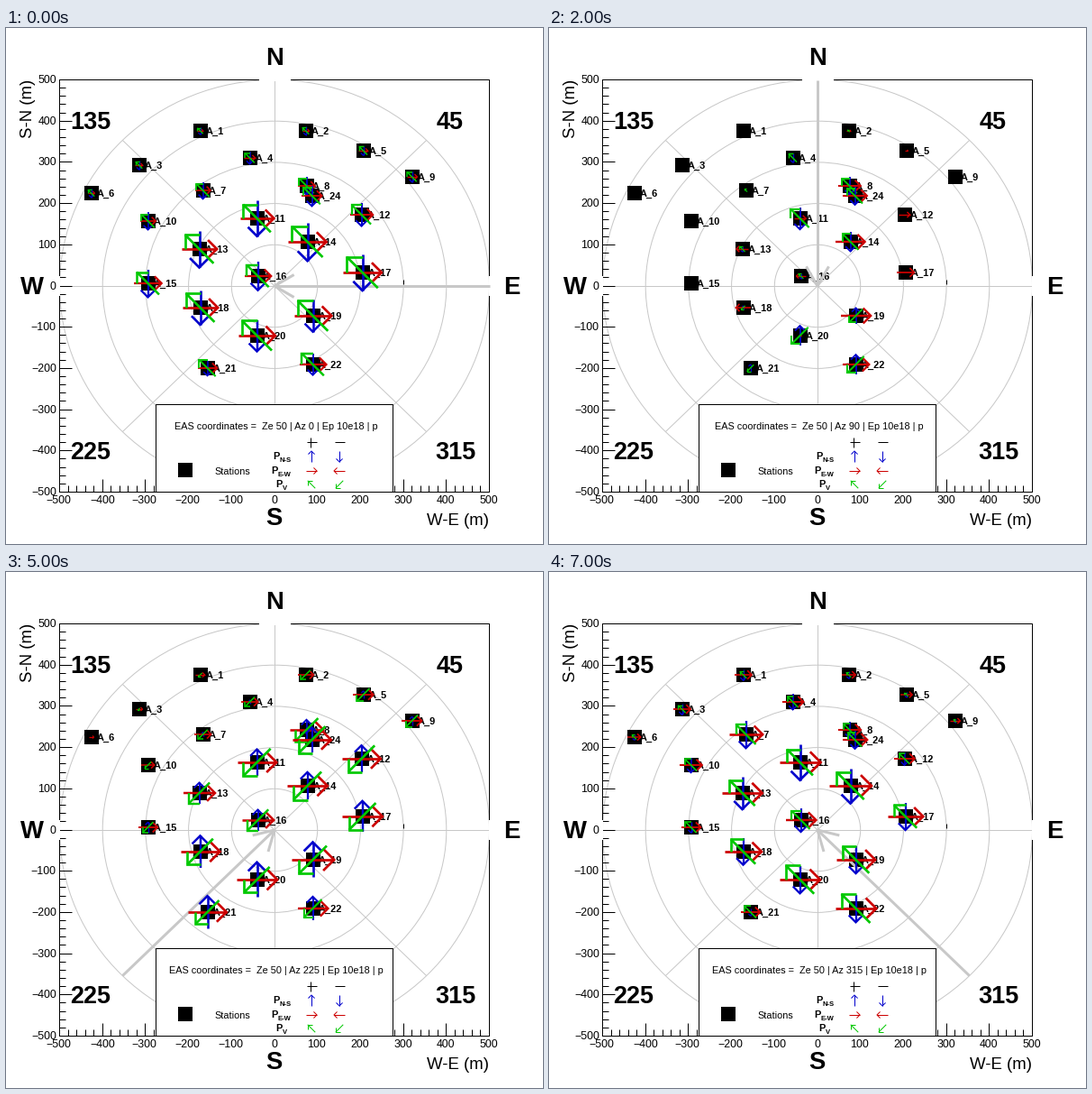
A matplotlib script for the animation above (8 s loop, 596 px wide and 572 px high).

```python
import numpy as np
import matplotlib.pyplot as plt
from matplotlib.animation import FuncAnimation
from matplotlib.collections import LineCollection
from matplotlib.patches import Ellipse, Rectangle

W, H, DPI = 596, 572, 100
PX = 72 / DPI
CX, CY, SX, SY = 298.0, 286.0, 0.477, 0.457   # plot centre, pixels per metre
RED, BLUE, GREEN = "#cc0000", "#0000cc", "#00c800"
GRID, BEAM = "#c8c8c8", "#c8c8c8"
ZENITH = np.radians(50)
FIELD = np.array([0, 0.82, 0.574])
EXCESS = 0.16                                 # radial share of the signal

# number: pixel position
STATIONS = {
    1: (216, 114), 2: (333, 114), 3: (148, 152), 4: (271, 144),
    5: (397, 136), 6: (95, 183), 7: (219, 180), 8: (334, 175),
    9: (451, 165), 10: (158, 214), 11: (279, 211), 12: (395, 207),
    13: (215, 245), 14: (335, 237), 15: (158, 283), 16: (280, 275),
    17: (396, 271), 18: (216, 310), 19: (341, 319), 20: (279, 341),
    21: (224, 377), 22: (341, 373), 24: (340, 186),
}

plt.rcParams["font.family"] = "Liberation Sans"
fig = plt.figure(figsize=(W / DPI, H / DPI), dpi=DPI, facecolor="white")
ax = fig.add_axes([0, 0, 1, 1])
ax.set_xlim(0, W)
ax.set_ylim(H, 0)
ax.axis("off")


def text(x, y, s, size, ha="center", bold=False, z=2):
    """Text whose capitals are centred on y."""
    return ax.text(x - 0.7, y - 0.8 + 0.36 * size, s, fontsize=size * PX, ha=ha,
                   va="baseline", weight="bold" if bold else "normal", zorder=z)


def line(xs, ys, color="black", width=1, z=1):
    ax.plot(xs, ys, color=color, lw=width * PX, zorder=z, solid_capstyle="butt")


def box(x0, y0, x1, y1, z, face="white", edge="none"):
    ax.add_patch(Rectangle((x0, y0), x1 - x0, y1 - y0, fc=face, ec=edge,
                           lw=PX, zorder=z))


def arrow(tail, tip, arm, half):
    """Shaft and open head as two polylines."""
    tail, tip = np.array(tail, float), np.array(tip, float)
    back = np.arctan2(*(tail - tip)[::-1])
    ends = [tip + arm * np.array([np.cos(back + s), np.sin(back + s)])
            for s in (-half, half)]
    return [np.array([tail, tip]), np.array([ends[0], tip, ends[1]])]


def centred(x, y, dx, dy, length, arm):
    step = np.array([dx, dy]) / np.hypot(dx, dy) * length / 2
    return arrow((x, y) - step, (x, y) + step, arm, np.pi / 4)


def draw_grid():
    for r in range(100, 501, 100):
        ax.add_patch(Ellipse((CX, CY), 2 * r * SX, 2 * r * SY, fill=False,
                             ec=GRID, lw=PX, zorder=1))
    for a in np.radians(range(0, 180, 45)):
        dx, dy = 500 * SX * np.cos(a), 500 * SY * np.sin(a)
        line([CX - dx, CX + dx], [CY - dy, CY + dy], GRID)
    line([441, 441], [279, 284], z=2)


def draw_axes():
    box(59, 57, 536, 514, 1.5, "none", "black")
    for m in range(-500, 501, 20):
        size = 14 if m % 100 == 0 else 7
        x, y = np.floor(CX + m * SX), np.floor(CY - m * SY)
        line([x, x], [514, 514 - size], z=1.5)
        line([59, 59 + size], [y, y], z=1.5)
        if m % 100 == 0:
            label = str(m).replace("-", "\u2212")
            text(x + 0.5, 523.5, label, 12.4, z=6)
            text(56.5, y + 0.5, label, 12.4, "right")
    text(536.5, 545, "W-E (m)", 18.6, "right")
    ax.text(24.5, 89, "S-N (m)", fontsize=18.6 * PX, rotation=90,
            ha="center", va="center")


def draw_compass():
    box(281, 10, 316, 59, 1.8)
    box(10, 275, 60, 297, 1.8)
    box(536, 275, 590, 297, 1.8)
    for x, y, s in [(298.5, 32, "N"), (298.5, 541.5, "S"),
                    (30, 286, "W"), (562, 286, "E")]:
        text(x, y, s, 27.5, bold=True)
    for x, y, s in [(94.5, 103, "135"), (493, 103, "45"),
                    (94.5, 469, "225"), (500, 469, "315")]:
        text(x, y, s, 27, bold=True)


def draw_legend():
    box(166, 417, 429, 514, 5, "white", "black")
    box(191, 482, 207, 498, 6, "black")
    text(232, 491.5, "Stations", 10.9, "left", z=6)
    line([333.5, 344.5], [459, 459], z=6)
    line([338, 338], [454, 465], z=6)
    line([365, 375.5], [459, 459], z=6)
    rows = [(297, 475, "N-S", BLUE, (0, -1), (0, 1)),
            (295, 491, "E-W", RED, (1, 0), (-1, 0)),
            (300, 506, "V", GREEN, (-1, -1), (-1, 1))]
    for x, y, sub, color, plus, minus in rows:
        text(x, y, "P", 11, "left", True, 6)
        text(x + 7.3, y + 4.3, sub, 7.6, "left", True, 6)
        for cx, way in ((339, plus), (370, minus)):
            for part in centred(cx, y, *way, 12, 5):
                line(part[:, 0], part[:, 1], color, 1, 6)


def draw_stations():
    for n, (x, y) in STATIONS.items():
        box(x - 8, y - 8, x + 8, y + 8, 2, "black")
        text(x + 6, y + 0.3, f"A_{n}", 11, "left", True, 2.5)


def signal(pos, az):
    """Signed arrow lengths (E-W, N-S, V) of a station for a shower azimuth."""
    v = -np.array([np.sin(ZENITH) * np.cos(az), np.sin(ZENITH) * np.sin(az),
                   np.cos(ZENITH)])
    p = np.array([(pos[0] - CX) / SX, (CY - pos[1]) / SY, 0])
    radial = p - (p @ v) * v
    d = np.linalg.norm(radial)
    size = np.interp(d, [0, 40, 100, 150, 175, 205, 230, 295, 365, 450, 600],
                     [34, 38, 48, 47, 43, 34, 27, 20, 15, 10, 4])
    e = (np.cross(v, FIELD) + EXCESS * radial / d) * [1, -1, -1]
    length = size + 10 * np.log(np.abs(e) + 1e-6)
    return np.sign(e) * np.clip(length, 0, None) * [1, 1, 1.1]


draw_grid()
draw_axes()
draw_compass()
draw_legend()
draw_stations()
info = text(301, 441.5, "", 10.9, z=6)
beam = LineCollection([], colors=BEAM, linewidths=3 * PX, zorder=3, capstyle="butt")
arrows = LineCollection([], zorder=4, capstyle="butt", joinstyle="miter")
ax.add_collection(beam, autolim=False)
ax.add_collection(arrows, autolim=False)


def update(i):
    deg = 45 * i
    az = np.radians(deg)
    info.set_text(f"EAS coordinates =  Ze 50 | Az {deg} | Ep 10e18 | p")
    start = (CX + 500 * SX * np.cos(az), CY - 500 * SY * np.sin(az))
    beam.set_segments(arrow(start, (CX, CY), 25, np.pi / 6))

    parts, colors, widths = [], [], []
    for x, y in STATIONS.values():
        ew, ns, up = signal((x, y), az)
        for size, way, color in ((ns, (0, -np.sign(ns)), BLUE),
                                 (ew, (np.sign(ew), 0), RED),
                                 (up, (-1, -np.sign(up)), GREEN)):
            size = abs(size)
            if size < 3:
                continue
            parts += centred(x - 0.5, y, *way, size, 0.36 * size)
            colors += [color] * 2
            widths += [PX * np.clip(0.9 + size / 22, 1.2, 2.7)] * 2
    arrows.set_segments(parts)
    arrows.set_color(colors)
    arrows.set_linewidths(widths)
    return info, beam, arrows


anim = FuncAnimation(fig, update, frames=8, interval=1000, repeat=True,
                     repeat_delay=0, blit=False)
plt.show()
```
